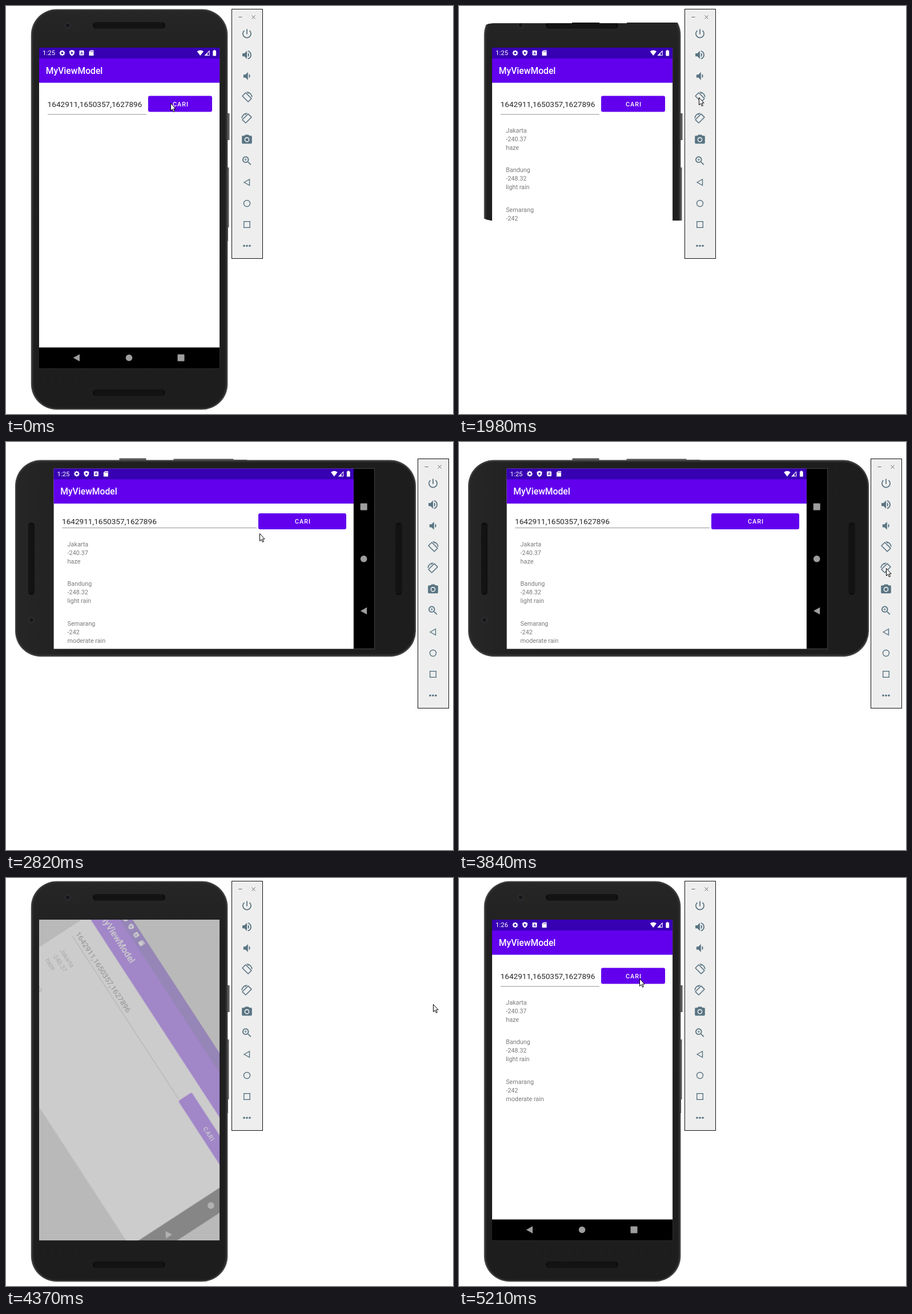
An HTML page with a canvas that plays this animation: 783 by 715 pixels, repeating every 5290 ms.

```html
<!DOCTYPE html>
<html lang="id">
<head>
<meta charset="utf-8">
<title>MyViewModel</title>
<style>
html, body { margin: 0; width: 100%; height: 100%; overflow: hidden; background: #fff; }
canvas { display: block; }
</style>
</head>
<body>
<canvas id="stage" width="783" height="715"></canvas>
<script>
let ctx = document.getElementById('stage').getContext('2d');
const layer = document.createElement('canvas');
layer.width = layer.height = 563;
const LOOP = 5290;
const PURPLE = '#6200ee';
const CITIES = [
  ['Jakarta', '-240.37', 'haze'],
  ['Bandung', '-248.32', 'light rain'],
  ['Semarang', '-242', 'moderate rain']
];

const PORTRAIT = {
  wide: false, x: 58, y: 73, w: 316.3, h: 562.3, contentW: 316.3, contentH: 525.4,
  textY: 103.5, lineY: 117, lineEnd: 188, buttonX: 191, buttonW: 112, buttonY: 84.5, listY: 149,
  nav: [[65.5, 543.5], [157.5, 543.5], [248.5, 543.5]], bar: [395, 5]
};
const LANDSCAPE = {
  wide: true, x: 83.4, y: 46.4, w: 562.4, h: 316.3, contentW: 525.5, contentH: 316.3,
  textY: 97.6, lineY: 104.1, lineEnd: 355.6, buttonX: 358.6, buttonW: 154, buttonY: 78.5, listY: 136.6,
  nav: [[543.3, 249.6], [543.3, 158.4], [543.3, 67]], bar: [721, 29]
};

// Toolbar glyphs on a 24-unit grid
const ROTATE = 'M16.48 2.52c3.27 1.55 5.61 4.72 5.97 8.48h1.5C23.44 4.84 18.29 0 12 0l-.66.03 3.81 3.81 1.33-1.32zM10.23 1.75c-.59-.59-1.54-.59-2.12 0L1.75 8.11c-.59.59-.59 1.54 0 2.12l12.02 12.02c.59.59 1.54.59 2.12 0l6.36-6.36c.59-.59.59-1.54 0-2.12L10.23 1.75zm4.6 19.44L2.81 9.17l6.36-6.36 12.02 12.02-6.36 6.36z';
const GLYPHS = [
  'M13 3h-2v10h2V3zm4.83 2.17l-1.42 1.42C17.99 7.86 19 9.81 19 12c0 3.87-3.13 7-7 7s-7-3.13-7-7c0-2.19 1.01-4.14 2.58-5.42L6.17 5.17C4.23 6.82 3 9.26 3 12c0 4.97 4.03 9 9 9s9-4.03 9-9c0-2.74-1.23-5.18-3.17-6.83z',
  'M3 9v6h4l5 5V4L7 9H3zm13.5 3c0-1.77-1.02-3.29-2.5-4.03v8.05c1.48-.73 2.5-2.25 2.5-4.02zM14 3.23v2.06c2.89.86 5 3.54 5 6.71s-2.11 5.85-5 6.71v2.06c4.01-.91 7-4.49 7-8.77s-2.99-7.86-7-8.77z',
  'M18.5 12c0-1.77-1.02-3.29-2.5-4.03v8.05c1.48-.73 2.5-2.25 2.5-4.02zM5 9v6h4l5 5V4L9 9H5z',
  ROTATE,
  ROTATE,
  'M12 8.8a3.2 3.2 0 1 0 0 6.4a3.2 3.2 0 1 0 0-6.4zM9 2L7.17 4H4c-1.1 0-2 .9-2 2v12c0 1.1.9 2 2 2h16c1.1 0 2-.9 2-2V6c0-1.1-.9-2-2-2h-3.17L15 2H9zm3 15c-2.76 0-5-2.24-5-5s2.24-5 5-5 5 2.24 5 5-2.24 5-5 5z',
  'M15.5 14h-.79l-.28-.27C15.41 12.59 16 11.11 16 9.5 16 5.91 13.09 3 9.5 3S3 5.91 3 9.5 5.91 16 9.5 16c1.61 0 3.09-.59 4.23-1.57l.27.28v.79l5 4.99L20.49 19l-4.99-5zm-6 0C7.01 14 5 11.99 5 9.5S7.01 5 9.5 5 14 7.01 14 9.5 11.99 14 9.5 14zm2.5-4h-2v2H9v-2H7V9h2V7h1v2h2v1z'
].map(d => new Path2D(d));
const POINTER = new Path2D('M.5 .5V13.5L3.4 10.8 5.4 15.4 7.4 14.5 5.4 10H9.2Z');

function rect(x, y, w, h, color) {
  ctx.fillStyle = color;
  ctx.fillRect(x, y, w, h);
}
function round(x, y, w, h, r, color) {
  ctx.beginPath();
  ctx.roundRect(x, y, w, h, r);
  ctx.fillStyle = color;
  ctx.fill();
}
function disc(x, y, r, color) {
  ctx.beginPath();
  ctx.arc(x, y, r, 0, 7);
  ctx.fillStyle = color;
  ctx.fill();
}
function poly(points, color) {
  ctx.beginPath();
  points.forEach(([x, y]) => ctx.lineTo(x, y));
  ctx.closePath();
  if (color) { ctx.fillStyle = color; ctx.fill(); } else ctx.stroke();
}
function text(str, x, y, size, color, weight = 400) {
  ctx.font = `${weight} ${size}px Roboto, sans-serif`;
  ctx.fillStyle = color;
  ctx.fillText(str, x, y);
}
function scoped(draw) {
  ctx.save();
  draw();
  ctx.restore();
}
// Runs the drawing on the spare canvas, so that it can be faded as one picture
function onLayer(draw) {
  const main = ctx;
  ctx = layer.getContext('2d');
  ctx.clearRect(0, 0, layer.width, layer.height);
  draw();
  ctx = main;
}

// Progress 0..1 that advances in n equal held steps from a to b
function stepped(t, a, b, n) {
  if (t < a) return 0;
  return Math.min(n, Math.floor((t - a) / (b - a) * (n - 1) + 0.01) + 1) / n;
}

function drawStatus(w, time) {
  rect(0, 0, w, 19, '#3700b3');
  text(time, 6, 13.3, 11.5, '#fff');
  const y = 9.3;
  ctx.lineWidth = 2;
  ctx.strokeStyle = '#fff';
  ctx.beginPath();
  ctx.arc(40.5, y, 2.9, 0, 7);
  ctx.stroke();
  for (let i = 0; i < 8; i++) {
    const a = i * Math.PI / 4;
    disc(40.5 + 4.1 * Math.cos(a), y + 4.1 * Math.sin(a), 0.95, '#fff');
  }
  poly([[57.5, 4], [62, 5.8], [61.8, 10], [60.2, 12.8], [57.5, 14.5], [54.8, 12.8], [53.2, 10], [53, 5.8]], '#fff');
  poly([[56.2, 6.8], [60, 9.2], [56.2, 11.6]], '#3700b3');
  round(70.5, 5, 8, 8.5, 1, '#fff');
  text('A', 72.2, 12, 7, '#3700b3', 500);
  poly([[90, 4.5], [95.5, 4.5], [95.5, 14], [87.5, 14], [87.5, 7]], '#fff');
  [90, 91.8, 93.6].forEach(x => rect(x, 5.7, 0.8, 2, '#3700b3'));

  ctx.beginPath();
  ctx.moveTo(w - 34, 14);
  ctx.lineTo(w - 39.7, 6.6);
  ctx.quadraticCurveTo(w - 34, 2.2, w - 28.3, 6.6);
  ctx.fillStyle = '#fff';
  ctx.fill();
  poly([[w - 27, 14], [w - 17.7, 14], [w - 17.7, 4.6]], '#fff');
  poly([[w - 21.3, 13], [w - 18.8, 13], [w - 18.8, 7.2], [w - 21.3, 9.7]], '#3700b3');
  round(w - 12, 5.2, 5.8, 9.2, 0.8, '#fff');
  rect(w - 10.4, 4, 2.6, 1.5, '#fff');
}

function drawNav(s) {
  if (s.wide) rect(s.contentW, 0, s.w - s.contentW, s.h, '#000');
  else rect(0, s.contentH, s.w, s.h - s.contentH, '#000');
  const [back, home, recent] = s.nav, grey = '#9e9e9e';
  poly([[back[0] - 5.8, back[1]], [back[0] + 5.5, back[1] - 6.3], [back[0] + 5.5, back[1] + 6.3]], grey);
  disc(home[0], home[1], 5.8, grey);
  round(recent[0] - 6, recent[1] - 6, 12, 12, 1, grey);
}

// App picture with its origin at the top left of the display
function drawApp(s, state) {
  rect(0, 0, s.w, s.h, '#fff');
  rect(0, 0, s.contentW, 61.5, PURPLE);
  drawStatus(s.contentW, state.time);
  text('MyViewModel', 11.8, 46, 15.7, '#fff', 500);
  text('1642911,1650357,1627896', 14.6, s.textY, 13.6, '#262626');
  rect(15, s.lineY - 0.5, s.lineEnd - 15, 1, '#929292');

  round(s.buttonX, s.buttonY, s.buttonW, 28, 3, PURPLE);
  if (state.ripple > 0 && state.ripple < 1) scoped(() => {
    ctx.clip();
    disc(230, 97, 12 + 90 * state.ripple, `rgba(255,255,255,${0.24 * (1 - state.ripple)})`);
  });
  ctx.letterSpacing = '1px';
  ctx.textAlign = 'center';
  text('CARI', s.buttonX + s.buttonW / 2 + 1, s.buttonY + 18, 10.8, '#fff', 500);
  ctx.letterSpacing = '0px';
  ctx.textAlign = 'left';

  if (state.list) CITIES.forEach((lines, i) => lines.forEach((line, j) =>
    text(line, 24.2, s.listY + i * 69.3 + j * 15, 10.8, '#7a7a7a')));
  if (state.spin >= 0) drawSpinner(158, 293, state.spin);
  drawNav(s);
}

function drawSpinner(x, y, elapsed) {
  const p = Math.min(1, elapsed / 666);
  const sweep = 10 + 270 * p * p * (3 - 2 * p);
  const start = -90 + 0.145 * elapsed;
  ctx.beginPath();
  ctx.arc(x, y, 13.7, start * Math.PI / 180, (start + sweep) * Math.PI / 180);
  ctx.lineWidth = 3;
  ctx.strokeStyle = '#12d3c6';
  ctx.stroke();
}

function drawGrille(y) {
  round(152, y, 127, 11, 5.5, '#0e0e0e');
  scoped(() => {
    ctx.strokeStyle = '#333';
    ctx.lineWidth = 1;
    ctx.setLineDash([1, 2]);
    for (let i = 0; i < 4; i++) {
      ctx.lineDashOffset = i % 2 * 1.5;
      ctx.beginPath();
      ctx.moveTo(156, y + 2 + i * 2.4);
      ctx.lineTo(275, y + 2 + i * 2.4);
      ctx.stroke();
    }
  });
}

// Device body in upright coordinates
function drawPhone() {
  rect(386, 188, 5.5, 47, '#5a5a5a');
  rect(386, 283, 4.5, 105, '#5a5a5a');
  rect(386, 388, 3, 24, '#444');
  round(43.8, 5.5, 344.6, 702, 45, '#484848');
  round(45.5, 7, 341.2, 699, 43.5, '#2c2c2c');
  const shade = ctx.createLinearGradient(0, 6, 0, 707);
  shade.addColorStop(0, '#262626');
  shade.addColorStop(0.15, '#202020');
  shade.addColorStop(1, '#1d1d1d');
  round(48, 9, 336.5, 695.5, 41, shade);
  disc(108, 34, 5.5, '#2e2e2e');
  disc(108, 34, 3.3, '#14161b');
  drawGrille(28.5);
  drawGrille(672);
}

function drawDevice(s) {
  scoped(() => {
    if (s.wide) ctx.transform(0, -1, 1, 0, 10.5, 420);
    drawPhone();
  });
}

function drawScreen(s, draw) {
  scoped(() => {
    ctx.translate(s.x, s.y);
    ctx.beginPath();
    ctx.rect(0, 0, s.w, s.h);
    ctx.clip();
    draw();
  });
}

// The old picture turns upright about the centre while a blank one fades in over black
function drawTurn(from, to, degrees, opacity, oldState, newState) {
  drawScreen(to, () => {
    if (opacity <= 0) return drawApp(to, newState);
    const level = Math.round(255 * (1 - opacity));
    rect(0, 0, to.w, to.h, `rgb(${level},${level},${level})`);
    onLayer(() => drawApp(from, oldState));
    ctx.translate(to.w / 2, to.h / 2);
    ctx.rotate(degrees * Math.PI / 180);
    ctx.globalAlpha = opacity;
    ctx.drawImage(layer, -from.w / 2, -from.h / 2);
  });
}

function drawToolbar([x, y]) {
  const tint = '#587482';
  scoped(() => {
    ctx.translate(x, y);
    rect(0, 0, 55, 438, '#111');
    rect(1, 1, 53, 436, '#eee');
    rect(12.5, 14, 6, 1, '#666');
    ctx.strokeStyle = '#666';
    ctx.lineWidth = 1;
    ctx.beginPath();
    ctx.moveTo(35.5, 11.5); ctx.lineTo(41.5, 17.5);
    ctx.moveTo(41.5, 11.5); ctx.lineTo(35.5, 17.5);
    ctx.stroke();
    ctx.fillStyle = ctx.strokeStyle = tint;
    GLYPHS.forEach((glyph, i) => scoped(() => {
      const rotating = i === 3 || i === 4;
      const k = rotating ? 0.78 : 0.88;
      ctx.translate(27, 43.5 + i * 37.15);
      ctx.scale(i === 4 ? -k : k, k);
      ctx.translate(-12, -12);
      ctx.fill(glyph, 'evenodd');
      ctx.lineWidth = 0.7;
      if (rotating) ctx.stroke(glyph);
    }));
    ctx.lineWidth = 1.4;
    poly([[22, 304], [31.5, 298.6], [31.5, 309.4]]);
    ctx.beginPath();
    ctx.arc(27, 341, 5.5, 0, 7);
    ctx.stroke();
    ctx.strokeRect(21.7, 372.7, 10.6, 10.6);
    [22, 27, 32].forEach(cx => disc(cx, 415.3, 1.8, tint));
  });
}

const MOVES = [
  { a: 1080, b: 1510, n: 6, to: [414, 160] },
  { a: 1590, b: 1591, n: 1, to: [420, 160] },
  { a: 2820, b: 2821, n: 1, to: [444, 160] },
  { a: 2900, b: 3290, n: 6, to: [727, 197] },
  { a: 3360, b: 3600, n: 4, to: [748, 221] },
  { a: 4440, b: 4750, n: 5, to: [378, 149] },
  { a: 4990, b: 5210, n: 4, to: [316, 176] }
];
function pointerAt(t) {
  let [x, y] = [288, 170];
  for (const { a, b, n, to } of MOVES) {
    const p = stepped(t, a, b, n);
    x += (to[0] - x) * p;
    y += (to[1] - y) * p;
  }
  return [Math.round(x), Math.round(y)];
}
function drawPointer(t) {
  scoped(() => {
    ctx.translate(...pointerAt(t));
    ctx.fillStyle = '#fff';
    ctx.strokeStyle = '#000';
    ctx.lineWidth = 1;
    ctx.fill(POINTER);
    ctx.stroke(POINTER);
  });
}

function clipToWideWindow() {
  ctx.beginPath();
  ctx.roundRect(16, 30.5, 702, 345.5, 45);
  ctx.rect(198, 29, 48, 6);
  ctx.rect(294, 29, 104, 6);
  ctx.clip();
}

// Held position inside a display turn that begins at `start`
function turnAt(t, start, first, last, n) {
  if (t < first) return { left: 1, opacity: 1 };
  const shown = first + (stepped(t, first, last, n) * n - 1) * (last - first) / (n - 1);
  const e = shown - start;
  return { left: Math.pow(1 - Math.min(1, e / 400), 5), opacity: Math.max(0, 1 - e / 48.3) };
}

function render(t) {
  rect(0, 0, 783, 715, '#fff');
  const loading = t >= 460 && t < 1010;
  const held = loading ? 400 + Math.floor((t - 860) / 80 + 0.01) * 80 : 0;
  const state = {
    time: '1:25',
    list: t >= 1010,
    spin: loading ? held : -1,
    ripple: loading ? (held + 60) / 380 : 0
  };
  const later = { ...state, time: '1:26' };
  const wide = t >= 2070 && t < 3920;
  const s = wide ? LANDSCAPE : PORTRAIT;

  scoped(() => {
    if (t >= 1980 && t < 2070) clipToWideWindow();
    drawDevice(s);
    if (wide && t < 2590) {
      const { left, opacity } = turnAt(t, 2255, 2290, 2590, 5);
      drawTurn(PORTRAIT, LANDSCAPE, -90 * left, opacity, state, state);
    } else if (t >= 3920 && t < 4750) {
      const { left, opacity } = turnAt(t, 4335, 4370, 4750, 6);
      drawTurn(LANDSCAPE, PORTRAIT, 90 * left, opacity, state, later);
    } else {
      drawScreen(s, () => drawApp(s, t >= 4750 ? later : state));
    }
  });
  drawToolbar(s.bar);
  drawPointer(t);
}

function tick() {
  render(performance.now() % LOOP);
  requestAnimationFrame(tick);
}
tick();
</script>
</body>
</html>
```
